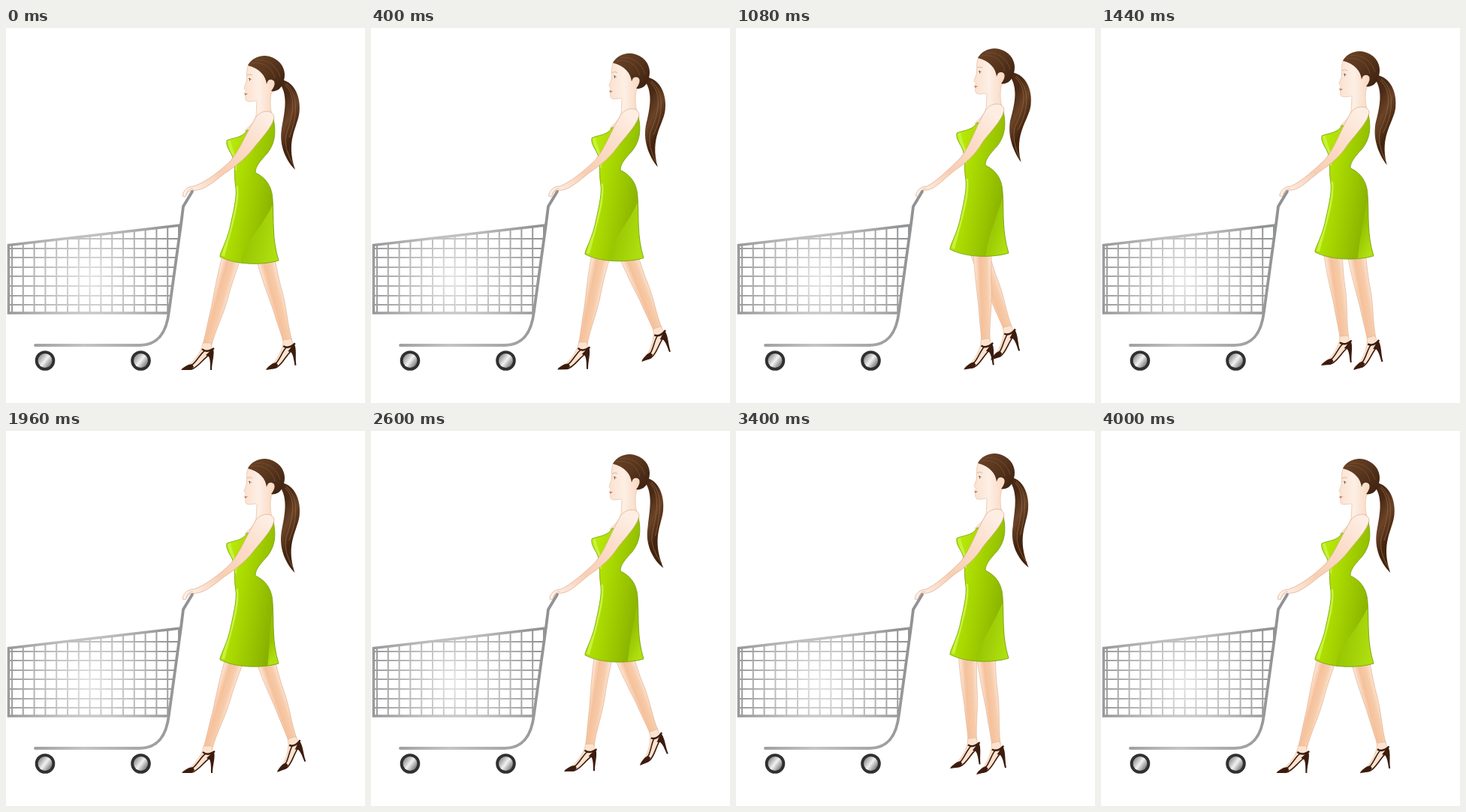
Animation, 478 px wide and 500 px high, one loop 4.04 s. Source, as an HTML page with a canvas:

```html
<!DOCTYPE html>
<html lang="en">
<head>
<meta charset="utf-8">
<title>Shopping walk</title>
<style>
  html, body { margin: 0; overflow: hidden; background: #fff; }
  canvas { display: block; }
</style>
</head>
<body>
<canvas id="stage" width="478" height="500"></canvas>
<script>
const ctx = document.getElementById('stage').getContext('2d');
const LOOP = 4040, STEP = 40, TAU = Math.PI * 2;

// Leg poses at these times: hip x, toe x, toe y, foot tilt in degrees
const TIMES = [0, 720, 1440, 1960, 2600, 3400];
const NEAR = [
  [302, 233, 456, 0], [316, 270, 455, -3], [340, 336, 456, -16],
  [345, 361, 455, -21], [336, 358, 446, -23], [309, 285, 450, -8]
];
const FAR = [
  [345, 346, 456, -9], [337, 366, 438, -27], [309, 293, 450, -6],
  [306, 234, 456, 0], [311, 257, 454, -1], [333, 320, 458, -13]
];

function linear(x0, y0, x1, y1, ...colors) {
  const g = ctx.createLinearGradient(x0, y0, x1, y1);
  colors.forEach((c, i) => g.addColorStop(i / (colors.length - 1), c));
  return g;
}

function shape(d, fill, stroke, width = 1) {
  const path = new Path2D(d);
  if (fill) {
    ctx.fillStyle = fill;
    ctx.fill(path);
  }
  if (stroke) {
    ctx.strokeStyle = stroke;
    ctx.lineWidth = width;
    ctx.stroke(path);
  }
}

function at(x, y, angle, draw) {
  ctx.save();
  ctx.translate(x, y);
  ctx.rotate(angle);
  draw();
  ctx.restore();
}

// Periodic monotone cubic through the poses
function poseAt(poses, t) {
  const n = TIMES.length;
  const time = i => TIMES[(i + n) % n] + Math.floor(i / n) * LOOP;
  let i = n - 1;
  while (TIMES[i] > t) i--;
  const span = time(i + 1) - time(i), u = (t - time(i)) / span;
  return poses[0].map((_, k) => {
    const value = j => poses[(j + n) % n][k];
    const slope = j => (value(j + 1) - value(j)) / (time(j + 1) - time(j));
    const tangent = j => {
      const a = slope(j - 1), b = slope(j);
      return a * b > 0 ? 2 * a * b / (a + b) : 0;
    };
    const p = value(i), q = value(i + 1);
    return p + (q - p) * u * u * (3 - 2 * u)
      + span * u * (1 - u) * ((1 - u) * tangent(i) - u * tangent(i + 1));
  });
}

function drawShoe() {
  const dark = '#3c1c0e';
  shape('M29 -36 C28 -27 21 -16 12 -8 L1 -2 L14 -2 C24 -6 29 -16 42 -24 L40 -36Z',
    '#fce3d0', '#dfad8a', .5);
  shape('M0 0 C2 -3 6 -5 10 -7 L15 -8 L17 -4 L13 0Z', dark);
  shape('M8 -1 L14 -1 C24 -4 29 -16 43 -24', null, dark, 1.6);
  shape('M33 -20 C37 -23 40 -28 43 -28 C45 -20 41 -10 41 0 L39 0 C39 -9 39 -14 37 -18Z', dark);
  shape('M28 -28 C32 -24 38 -25 44 -29', null, dark, 2.4);
  shape('M32 -26 C26 -22 22 -13 15 -7', null, dark, 1.6);
}

function drawLeg(poses, t, dy) {
  const [hip, toeX, toeY, tilt] = poseAt(poses, t);
  const a = tilt * Math.PI / 180, c = Math.cos(a), s = Math.sin(a);
  const hipY = 302 + dy;
  const dx = toeX + 35 * c + 33 * s - hip, dz = toeY + 35 * s - 33 * c - hipY;
  const len = Math.hypot(dx, dz);
  at(hip, hipY, Math.atan2(-dx, dz), () => {
    const y = f => len * f;
    shape(`M-13 -4 C-13 ${y(.25)} -10 ${y(.45)} -8.5 ${y(.6)} C-7.5 ${y(.8)} -6 ${y(.9)} -6 ${y(1)}
      L5.5 ${y(1)} C5 ${y(.8)} 10 ${y(.65)} 9.5 ${y(.43)} C9 ${y(.3)} 11 ${y(.1)} 12 -4`,
      linear(-13, 0, 12, 0, '#fdebde', '#f5c19b', '#f7cba9', '#fdeadc'), '#dfad8a', .6);
  });
  at(toeX, toeY, a, drawShoe);
}

function drawTail(s) {
  const tip = 385 - 5.5 * s, out = 2 * s;
  shape(`M367 69 C${385 + out} 72 ${393 + out} 94 ${390.5 + out} 113
    C${388 + out} 133 ${372 - out} 150 ${tip} 189
    C${374 - out} 178 ${363 - out} 158 ${367 - out} 134 C371 112 375 94 367 78Z`,
    linear(364, 110, 392, 125, '#4a2a15', '#6b4327', '#43240f'));
  shape(`M372 76 C${388 + out} 92 ${381 + out} 120 ${373 - out} 142 Q${369 - out} 160 ${tip - 2} 183
    M373 74 C${393 + out} 92 ${385 + out} 125 ${377 - out} 146`, null, '#8d6441', .8);
}

function drawHead() {
  const line = '#e2b797';
  shape(`M323 48 C319 58 321 66 320 72 C318 78 316 80 318 82 L320 84 C316 87 318 88 319 90
    C318 95 319 98 324 98 C330 98 333 96 334 98 L333 117 C330 128 323 131 318 137
    L340 146 L357 122 C352 112 351 100 353 88 L362 72 L345 45Z`,
    linear(318, 90, 356, 90, '#fbe2d0', '#fdefe5', '#fad9c3'), line, .6);
  shape('M317.5 87 L322 87.5 L318.5 90Z', '#c27b66');
  shape('M323 67.5 Q325 66.5 326.5 69 M324.5 67.5 L324.5 70.5', null, '#694d3b', .9);
  shape('M321 63 Q325 60.5 328 63', null, '#c7a78d', .7);
  shape(`M322 50 C328 38 345 33 358 41 C370 48 373 60 370 70 C368 80 360 86 353 84
    C359 77 359 70 354 69 C349 68 348 72 347 75 C346 64 338 54 322 50Z`,
    linear(325, 40, 370, 80, '#6a4226', '#57351d', '#3d2110'));
  shape('M327 47 C345 44 355 55 358 67 M332 43 C350 41 361 52 365 65', null, '#7a5233', .8);
}

function drawDress(turn) {
  const dress = `M294 150 C302 146 315 147 321 136 L343 140 L356 121
    C360 140 358 154 348 167 C339 177 332 184 332 193 C343 198 354 208 355 228
    C357 258 354 280 363 310 C348 315 310 318 285 305 C284 301 295 283 299 262
    C304 240 308 222 305.5 210 C303 192 307 182 300 168 C295 160 293 155 294 150Z`;
  shape(dress, linear(288, 220, 362, 232, '#b9ea08', '#a9d900', '#98c400', '#86ae00'));
  ctx.save();
  ctx.clip(new Path2D(dress));
  const x = 330 - 18 * turn;
  shape(`M${x} 318 C${x + 4} 285 ${x * .4 + 210} 276 355 236 L370 320Z`,
    linear(x, 285, 362, 295, '#95c200', '#b0e010'));
  shape('M297 150 C300 166 307 174 305 190 M307 211 C310 230 301 260 289 304',
    null, '#c6f33a', 4);
  ctx.restore();
  shape(dress, null, '#719f08', .8);
}

function drawArm(dy, wave) {
  const sx = 2.2 * (1 - wave), e = dy * .4;
  const hx = x => x + sx, sy = y => y + dy, ey = y => y + e;
  shape(`M${hx(235)} 224 C${hx(236)} 216 ${hx(242)} 211 ${hx(250)} 211
    C265 206 285 ${ey(191)} 299 ${ey(177)} C312 ${ey(161)} 320 ${sy(140)} 331 ${sy(122)}
    C336 ${sy(110)} 354 ${sy(107)} 357 ${sy(118)} C356 ${sy(131)} 339 ${sy(148)} 329 ${sy(161)}
    C317 ${ey(176)} 303 ${ey(186)} 291 ${ey(194)} C276 ${ey(206)} 266 214 255 216
    C248 217 ${hx(242)} 215 ${hx(239)} 225Z`,
    linear(345, 115, 245, 220, '#fdeee4', '#fbdcc7', '#f8ceb3', '#fff0e6'), '#dcaa88', .7);
  shape(`M${hx(240)} 222 Q${hx(242)} 214 ${hx(249)} 214`, null, '#dcaa88', .6);
}

function drawCart() {
  const metal = ctx.createRadialGradient(112, 335, 5, 112, 335, 125);
  metal.addColorStop(0, '#e2e2e2');
  metal.addColorStop(.5, '#bcbcbc');
  metal.addColorStop(1, '#929394');
  ctx.lineCap = 'round';
  let grid = '';
  for (let x = 8; x < 232; x += 14.8) grid += `M${x} 255V380`;
  for (let y = 281; y < 378; y += 12.6) grid += `M3 ${Math.round(y)}H232`;
  ctx.save();
  ctx.clip(new Path2D('M3 289 L232 263 L216 380 H3Z'));
  shape(grid, null, metal, 2);
  ctx.restore();
  shape('M232 263 L3.5 289.5 V380 H216', null, metal, 3.6);
  shape('M248 218 L236 238 L233.5 258 L217 378 C214 404 204 423 178 423 H39',
    null, linear(38, 0, 235, 0, '#a0a0a0', '#c4c4c4', '#aaa', '#919294'), 3.8);
  ctx.lineCap = 'butt';
  for (const x of [52, 179.5]) at(x, 443.5, 0, () => {
    shape('M-13.3 0 a13.3 13.3 0 1 0 26.6 0 a13.3 13.3 0 1 0 -26.6 0', '#303030');
    shape('M-9.4 0 a9.4 9.4 0 1 0 18.8 0 a9.4 9.4 0 1 0 -18.8 0',
      linear(-8, -6, 8, 6, '#8c8c8c', '#f2f2f2', '#777'));
  });
}

function draw(t) {
  const turn = TAU * t / LOOP, wave = Math.cos(2 * turn), dy = 5 * wave - 5;
  ctx.fillStyle = '#fff';
  ctx.fillRect(0, 0, 478, 500);
  drawLeg(FAR, t, dy);
  drawLeg(NEAR, t, dy);
  at(0, dy, 0, () => {
    drawTail(Math.sin(turn));
    drawHead();
    drawDress(Math.cos(turn));
  });
  drawArm(dy, wave);
  drawCart();
}

function tick() {
  draw(Math.floor(performance.now() % LOOP / STEP) * STEP);
  requestAnimationFrame(tick);
}
tick();
</script>
</body>
</html>
```
